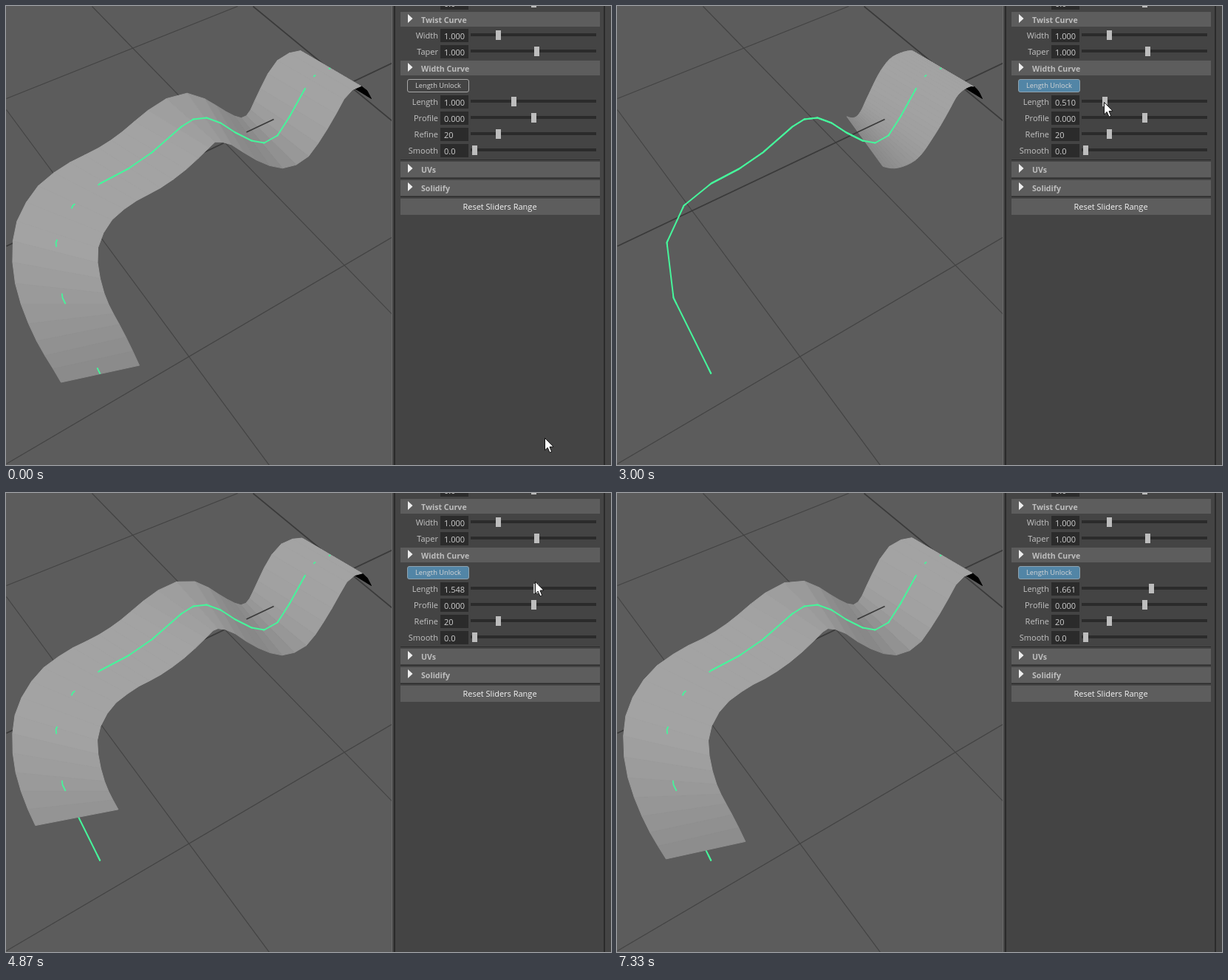
These frames come from a looping animation (819x622 px, 8140 ms). An HTML page with a canvas:

```html
<!DOCTYPE html>
<html lang="en">
<head>
<meta charset="utf-8">
<title>Ribbon length</title>
<style>
html, body { margin: 0; width: 100%; height: 100%; overflow: hidden; background: #444; }
canvas { display: block; }
</style>
</head>
<body>
<canvas id="stage" width="819" height="622"></canvas>
<script>
const ctx = document.getElementById('stage').getContext('2d');
const LOOP = 8140, STEP = 200 / 3, FULL = 1.697, SPANS = 36;
const FONT = '"Open Sans", "Noto Sans", sans-serif';
const GREEN = '#46f59b', DARK = '#2b2b2b', BAR = '#5d5d5d', AXIS = '#3a3a3a';

// Guide curve: length, x, y
const SPINE = [
  [0, 455, 101], [.05, 448, 90], [.1, 438, 84], [.17, 417, 94], [.22, 404, 112],
  [.31, 383, 150], [.39, 367, 175], [.46, 349, 185], [.52, 332, 182], [.59, 310, 171],
  [.65, 290, 158], [.7, 271, 151], [.745, 253, 153], [.79, 237, 163], [.905, 197, 198],
  [.995, 165, 220], [1.095, 127, 240], [1.188, 90, 270], [1.295, 67, 320],
  [1.442, 76, 395], [FULL, 127, 498]
];
// Half of the ribbon's width: length, dx, dy
const WIDTH = [
  [0, 39, 24], [.1, 41, 24], [.22, 46, 27], [.31, 44, 28], [.39, 38, 32], [.46, 29, 34],
  [.56, 21, 33], [.66, 18, 31], [.71, 24, 33], [.81, 42, 25], [1, 42, 27],
  [1.2, 51, 22], [1.4, 60, 8], [1.55, 56, -11], [FULL, 53, -11.5]
];

// Keys below are counted in steps of 1/15 s
const LENGTH = [[39, 1], [45, .51], [52, 1.643], [57, .661], [59, .56], [65, 1.5],
  [68, 1.661], [71, 1.661], [73, 1.548], [82, .812], [84, .7], [85, .7],
  [96, 1.611], [98, 1.611], [101, 1.661]];
const POINTER = [[0, 729, 585], [4, 127, 497], [11, 253, 153], [13, 377, 141],
  [17, 570, 81], [18, 570, 81], [22, 570, 103], [31, 570, 103], [34, 690, 124],
  [36, 690, 124], [38, 686, 130], [45, 661, 130], [57, 668, 121], [104, 721, 117],
  [107, 735, 300], [110, 678, 626]];

function locate(keys, t) {
  let i = 1;
  while (i < keys.length - 1 && keys[i][0] < t) i++;
  const a = keys[i - 1], b = keys[i];
  return { i, a, b, u: Math.min(1, Math.max(0, (t - a[0]) / (b[0] - a[0]))) };
}

function lerp(keys, t, col = 1) {
  const { a, b, u } = locate(keys, t);
  return a[col] + (b[col] - a[col]) * u;
}

// Cubic Hermite through all keys
function smooth(keys, t, col) {
  const { i, a, b, u } = locate(keys, t), h = b[0] - a[0], v = 1 - u;
  const slope = k => {
    const p = keys[Math.max(0, k - 1)], q = keys[Math.min(keys.length - 1, k + 1)];
    return (q[col] - p[col]) / (q[0] - p[0]);
  };
  return a[col] * v * v * (1 + 2 * u) + b[col] * u * u * (3 - 2 * u) +
    h * u * v * (slope(i - 1) * v - slope(i) * u);
}

const center = s => [smooth(SPINE, s, 1), smooth(SPINE, s, 2)];

function section(s) {
  const [x, y] = center(s), dx = smooth(WIDTH, s, 1), dy = smooth(WIDTH, s, 2);
  return { left: [x - dx, y - dy], right: [x + dx, y + dy] };
}

function shade(s) {
  const dip = 27 * Math.exp(-(((s - .55) / .16) ** 2));
  return Math.round(163 - dip - 65 * Math.max(0, s - 1.3));
}

function rect(x, y, w, h, color) {
  ctx.fillStyle = color;
  ctx.fillRect(x, y, w, h);
}

function trace(points) {
  ctx.beginPath();
  points.forEach(p => ctx.lineTo(p[0], p[1]));
}

function line(points, color, width) {
  trace(points);
  ctx.strokeStyle = color;
  ctx.lineWidth = width;
  ctx.stroke();
}

function shape(points, fill, stroke) {
  trace(points);
  ctx.closePath();
  ctx.fillStyle = fill;
  ctx.fill();
  if (!stroke) return;
  ctx.strokeStyle = stroke;
  ctx.lineWidth = 1;
  ctx.stroke();
}

function text(str, x, y, color, size = 11, align = 'left', weight = 400) {
  ctx.font = `${weight} ${size}px ${FONT}`;
  ctx.textAlign = align;
  ctx.fillStyle = color;
  ctx.fillText(str, x, y);
}

function drawGrid() {
  line([[0, 125], [313, 0]], '#434343', 1.2);
  line([[116, 0], [522, 417]], '#434343', 1.2);
  line([[0, 140], [356, 622]], '#434343', 1.2);
  line([[0, 620], [522, 313]], '#434343', 1.2);
  line([[0, 325], [522, 77]], AXIS, 1.7);
  line([[334, 0], [522, 155]], AXIS, 1.7);
}

function drawRibbon(len) {
  let p = section(0);
  for (let k = 1; k <= SPANS; k++) {
    const q = section(len * k / SPANS);
    const back = (q.left[0] - p.left[0]) * (p.right[1] - p.left[1]) >
      (q.left[1] - p.left[1]) * (p.right[0] - p.left[0]);
    const g = shade(len * (k - .5) / SPANS);
    const color = back ? '#000' : `rgb(${g},${g},${g})`;
    shape([p.left, q.left, q.right, p.right], color, color);
    p = q;
  }
}

// Parts of the guide that rise above the ribbon: one run and the corners
function drawGuideOver() {
  line(SPINE.filter(p => p[0] > .2 && p[0] < 1.1).map(p => [p[1], p[2]]), GREEN, 2);
  const toward = (p, q) => [p[1] + (q[1] - p[1]) * .08, p[2] + (q[2] - p[2]) * .08];
  SPINE.forEach((p, i) => {
    if (p[0] < .1) return;
    line([toward(p, SPINE[i - 1]), [p[1], p[2]], toward(p, SPINE[i + 1] || p)], GREEN, 1.8);
  });
}

function drawView(len) {
  rect(0, 0, 522, 622, '#5c5c5c');
  ctx.save();
  ctx.beginPath();
  ctx.rect(0, 0, 522, 622);
  ctx.clip();
  ctx.translate(.5, .5);
  ctx.lineJoin = 'round';
  drawGrid();
  line(SPINE.slice(2).map(p => [p[1], p[2]]), GREEN, 2);
  drawRibbon(len);
  line([[325, 170.5], [362, 153]], AXIS, 1.7);
  drawGuideOver();
  ctx.restore();
}

function header(title, y, h) {
  const m = y + 9;
  rect(534, y, 270, h, BAR);
  shape([[544, m - 6], [550.5, m], [544, m + 6]], '#eee');
  text(title, 562, y + 15, '#bdbdbd', 10.6, 'left', 700);
}

function row(label, value, y, knob) {
  text(label, 585, y + 4, '#c4c4c4', 11, 'right');
  rect(588, y - 9, 38, 18, DARK);
  text(value, 593, y + 5, '#d0d0d0');
  rect(629, y - 3, 170, 4, DARK);
  rect(Math.round(knob) - 3, y - 7, 7, 13, '#bdbdbd');
}

function button(on, hover) {
  ctx.beginPath();
  ctx.roundRect(543.5, 99.5, 83, 17, 2.5);
  ctx.fillStyle = on ? '#5285a6' : hover ? '#505050' : '#444';
  ctx.fill();
  ctx.strokeStyle = on && !hover ? '#8fa3b0' : '#a8a8a8';
  ctx.lineWidth = 1;
  ctx.stroke();
  text('Length Unlock', 585, 111, hover ? '#fff' : '#d6d6d6', 9.3, 'center', hover ? 600 : 400);
}

const knobX = len => 687 + (len - 1) * 54.5;

function drawPanel(len, on, hover) {
  rect(522, 0, 297, 622, '#444');
  rect(522, 0, 1, 622, '#6a6a6a');
  rect(525, 0, 2, 622, DARK);
  rect(809, 0, 2, 622, DARK);
  row('', '0.0', -4, 714);
  header('Twist Curve', 8, 20);
  row('Width', '1.000', 40, 666);
  row('Taper', '1.000', 62, 718);
  header('Width Curve', 74, 20);
  button(on, hover);
  row('Length', len.toFixed(3), 130, knobX(len));
  row('Profile', '0.000', 152, 714);
  row('Refine', '20', 174, 666);
  row('Smooth', '0.0', 196, 634);
  for (let y = 208; y < 260; y += 25) rect(534, y, 270, 1, DARK);
  header('UVs', 211, 21);
  header('Solidify', 236, 21);
  rect(534, 261, 270, 22, BAR);
  text('Reset Sliders Range', 668.5, 276, '#f4f4f4', 11, 'center');
}

function pointerAt(f, len) {
  if (f >= 4 && f <= 11) return center(FULL - (f - 4) / 7 * (FULL - .745));
  const y = lerp(POINTER, f, 2);
  return f >= 39 && f <= 104 ? [Math.round(knobX(len)) - 1, y] : [lerp(POINTER, f, 1), y];
}

function drawPointer(x, y) {
  const arrow = [[.5, .5], [.5, 17], [4.2, 13.5], [7, 20.2], [9.7, 19], [7, 12.5], [12, 12.2]];
  shape(arrow.map(p => [x + p[0], y + p[1]]), '#fff', '#111');
}

function draw(time) {
  const f = Math.floor((time % LOOP + 5) / STEP) % 122;
  const on = f >= 27, hover = f >= 20 && f < 33;
  const len = lerp(LENGTH, f);
  drawView(on ? len : FULL);
  drawPanel(len, on, hover);
  if (f < 110) drawPointer(...pointerAt(f, len));
}

let start;
function tick(now) {
  start ??= now;
  draw(now - start);
  requestAnimationFrame(tick);
}
requestAnimationFrame(tick);
</script>
</body>
</html>
```
